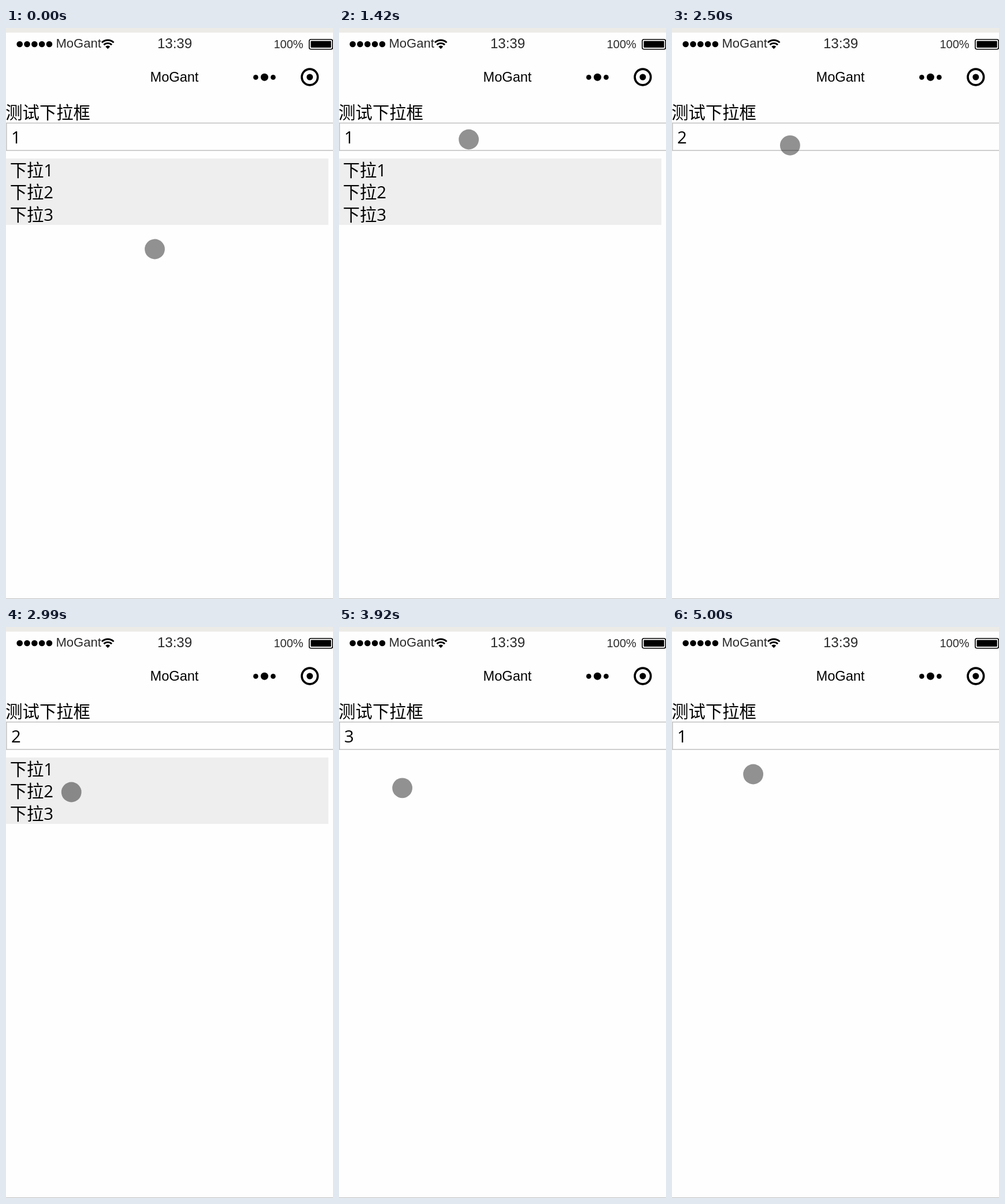
Recreate the animation shown at these times as an HTML page. Size 566 px wide and 989 px high, loop 5.31 s.

```html
<!DOCTYPE html>
<html lang="zh-CN">
<head>
<meta charset="utf-8">
<style>
  html, body { margin: 0; width: 100%; height: 100%; overflow: hidden; background: #fefefe; }
  svg { display: block; width: 566px; height: 989px; }
  text { font: 29.3px "Open Sans", "Noto Sans CJK SC", "Noto Sans CJK", sans-serif; }
  .bar text { font-family: "Liberation Sans", Arial, sans-serif; fill: #2a2a2a; }
</style>
</head>
<body>
<svg viewBox="0 0 566 989">
  <rect width="566" height="8" fill="#ecebe7"/>
  <rect y="988" width="566" height="1" fill="#bdbdbd"/>

  <g class="bar">
    <path d="M23.7 28h.01M36.5 28h.01M49.3 28h.01M62.1 28h.01M74.9 28h.01" stroke="#000" stroke-width="10.6" stroke-linecap="round"/>
    <text x="86.5" y="34" style="font-size:22px">MoGant</text>
    <g fill="none" stroke="#000" stroke-width="2.9">
      <path d="M166 25.2a14.6 14.6 0 0 1 20.4 0M169.4 29.2a9.6 9.6 0 0 1 13.6 0"/>
      <path d="M172.2 32.2a5.6 5.6 0 0 1 8 0l-4 4.1z" fill="#000" stroke="none"/>
    </g>
    <text x="262" y="35" style="font-size:24px">13:39</text>
    <text x="463.5" y="35" style="font-size:20px">100%</text>
    <rect x="524.8" y="19.8" width="40.5" height="17" rx="3" fill="none" stroke="#000" stroke-width="1.6"/>
    <rect x="527.5" y="22.5" width="35.2" height="11.6" rx="1"/>
    <text x="249.5" y="93" style="font-size:23.6px;fill:#000">MoGant</text>
    <circle cx="432.3" cy="85.4" r="4.3"/>
    <circle cx="447.4" cy="85.2" r="6.5"/>
    <circle cx="462.4" cy="85.4" r="4.3"/>
    <circle cx="525.8" cy="85" r="13.8" fill="none" stroke="#000" stroke-width="3.7"/>
    <circle cx="525.8" cy="85" r="5.5"/>
  </g>

  <text x="-.7" y="157.3">测试下拉框</text>
  <rect x=".8" y="164.6" width="600" height="47.5" fill="none" stroke="#c9c9c9" stroke-width="1.8"/>
  <text id="value" x="9" y="199.6">1</text>

  <g id="list">
    <rect y="226" width="558" height="115" fill="#eee"/>
    <text x="6.7" y="256.7">下拉1</text>
    <text x="6.7" y="295.2">下拉2</text>
    <text x="6.7" y="333.7">下拉3</text>
  </g>

  <g id="pointer">
    <circle r="17.4" fill="#000" fill-opacity=".433"/>
    <circle id="press" r="21.8" fill="#ff0" fill-opacity=".48"/>
  </g>
</svg>
<script>
const LOOP = 5310;
const $ = id => document.getElementById(id);
const linear = p => p;
const easeIn = p => p ** 1.5;
const easeOut = p => 1 - (1 - p) ** 2;
const smooth = p => p * p * (3 - 2 * p);

// start time, step length, step count, end x, end y, easing
const moves = [
  [90, 80, 6, 224.6, 193, smooth],
  [1730, 80, 4, 202.6, 269.8, smooth],
  [2350, 80, 3, 205, 180, smooth],
  [2750, 80, 2, 176, 251, linear],
  [2910, 80, 2, 113.2, 286, linear],
  [3060, 80, 4, 57, 328.5, easeOut],
  [3760, 80, 3, 109.6, 278.8, easeIn],
  [3980, 80, 4, 200.7, 186, easeOut],
  [4300, 80, 1, 200.7, 183.8, linear],
  [4530, 78, 5, 140.6, 255, smooth]
];
const presses = [[640, 720], [1280, 1420], [2030, 2130], [2590, 2670], [3380, 3450], [4300, 4380], [4920, 5000]];
const opened = [[0, 720], [1420, 2130], [2670, 3520], [4380, 5000]];

const within = (spans, t) => spans.some(([a, b]) => t >= a && t < b);
const show = (id, on) => $(id).setAttribute("visibility", on ? "visible" : "hidden");

function position(t) {
  let x = 257.5, y = 383;
  for (const [start, step, count, toX, toY, ease] of moves) {
    if (t < start) break;
    const p = ease(Math.min(count, Math.floor((t - start) / step) + 1) / count);
    x += (toX - x) * p;
    y += (toY - y) * p;
  }
  return [x, y];
}

function draw(now) {
  const t = now % LOOP;
  $("pointer").setAttribute("transform", `translate(${position(t)})`);
  show("press", within(presses, t));
  show("list", within(opened, t));
  $("value").textContent = t < 2130 || t >= 5000 ? 1 : t < 3520 ? 2 : 3;
}

const begin = performance.now();
function tick() {
  draw(performance.now() - begin);
  requestAnimationFrame(tick);
}
tick();
</script>
</body>
</html>
```
